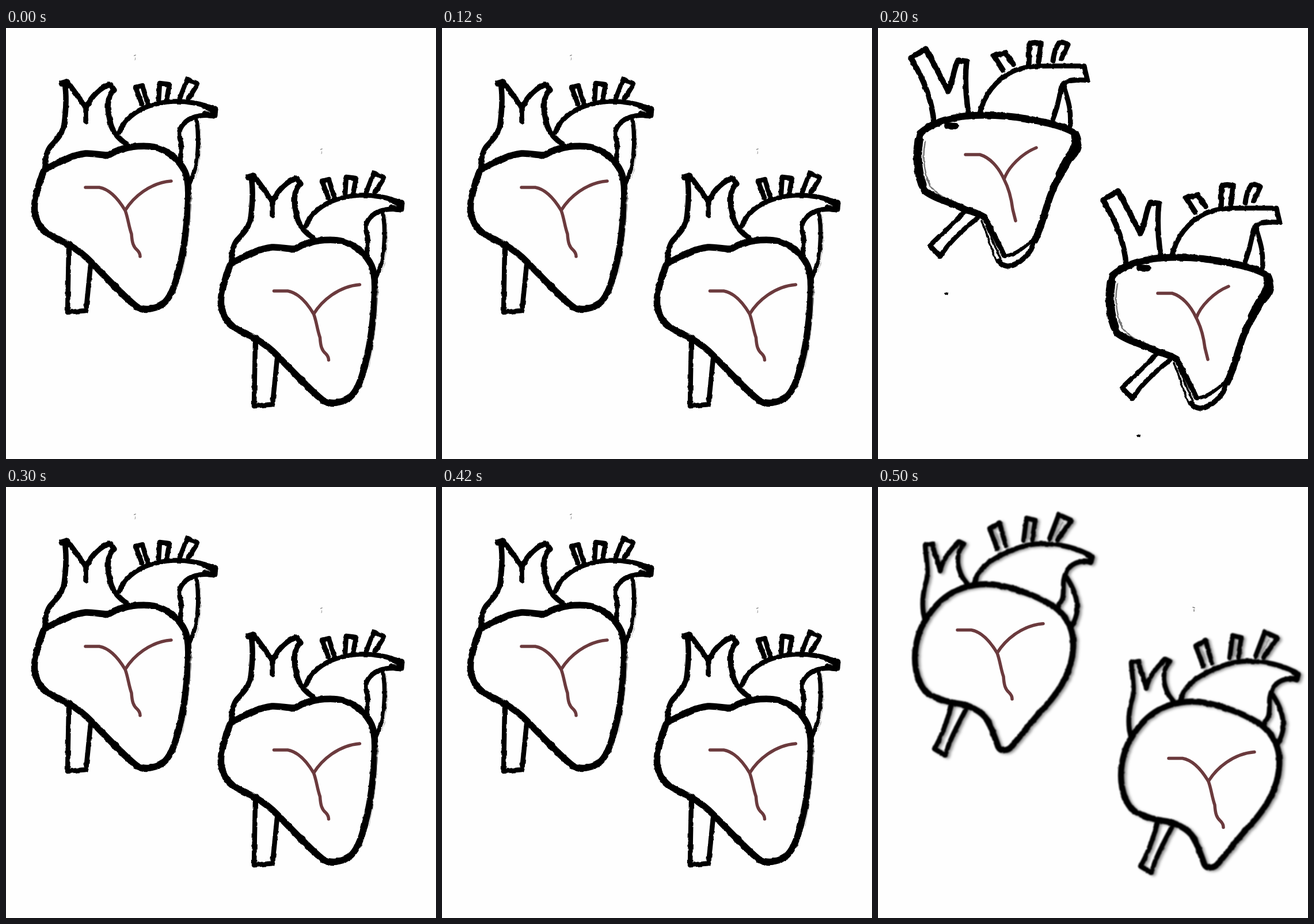
Write an HTML page that moves like this. It is 747x749 px and loops after 0.6 s.

```html
<!DOCTYPE html>
<html lang="en">
<head>
<meta charset="utf-8">
<title>Beating hearts</title>
<style>
  html, body { margin: 0; width: 100%; height: 100%; overflow: hidden; background: #fefefe; }
  svg { display: block; width: 100%; height: 100%; }
  path { fill: none; stroke-linecap: round; stroke-linejoin: round; }
</style>
</head>
<body>
<svg id="stage" viewBox="0 0 747 749" preserveAspectRatio="none">
  <defs>
    <filter id="rough" filterUnits="userSpaceOnUse" x="0" y="0" width="420" height="540" color-interpolation-filters="sRGB">
      <feTurbulence type="fractalNoise" baseFrequency="0.1" numOctaves="2" seed="4"/>
      <feColorMatrix values="1 0 0 0 0  0 1 0 0 0  0 0 1 0 0  0 0 0 0 1"/>
      <feDisplacementMap in="SourceGraphic" scale="3.5" xChannelSelector="R" yChannelSelector="G"/>
      <feGaussianBlur stdDeviation="0.6"/>
    </filter>
    <filter id="shaded" filterUnits="userSpaceOnUse" x="0" y="0" width="420" height="540" color-interpolation-filters="sRGB">
      <feTurbulence type="fractalNoise" baseFrequency="0.1" numOctaves="2" seed="9"/>
      <feColorMatrix values="1 0 0 0 0  0 1 0 0 0  0 0 1 0 0  0 0 0 0 1"/>
      <feDisplacementMap in="SourceGraphic" scale="3" xChannelSelector="R" yChannelSelector="G"/>
      <feGaussianBlur stdDeviation="0.8"/>
      <feDropShadow dx="4" dy="2" stdDeviation="2.2" flood-color="#000" flood-opacity="0.4"/>
    </filter>
  </defs>
</svg>
<script>
const INK = '#000', GREY = '#777', VEIN = '#6b3a3d';
const FORK = 'M138 277H162C179 280 195 297 207 317C221 294 250 269 287 266M207 317C212 330 213 344 218 358C219 373 221 380 228 386Q233 391 233 397';

// Each stroke is [width, path, colour].
const relaxed = {
  filter: 'rough',
  ink: [
    [11.5, 'M66 247C86 235 112 221 138 218C155 217 168 223 180 220C200 206 240 202 262 208C285 215 303 232 311 250C319 268 317 300 315 325C312 365 306 400 299 425C293 450 285 470 272 480C258 489 240 491 228 485C210 472 180 440 148 407C135 393 120 383 108 376C92 367 70 360 60 345C48 328 47 310 53 288C57 270 62 258 66 247Z'],
    [9.5, 'M66 246C68 235 69 215 78 205C88 194 97 186 101 168C104 145 106 120 102 96L96 96L106 93L139 138V162M139 138C149 118 164 103 181 98L188 108C176 115 175 140 180 158C183 180 195 192 210 202'],
    [8.5, 'M196 182C204 161 225 143 250 135C280 126 300 126 325 130C345 133 355 138 364 143L362 153C345 150 325 152 312 163C300 174 299 183 304 198C306 212 302 222 303 232'],
    [11, 'M345 136L363 142L362 152L346 150'],
    [7.5, 'M331 160C336 190 334 215 330 238C326 255 322 263 318 272'],
    [8.5, 'M236 132L225 103L237 100L246 131M265 127L267 96L284 98L279 125M302 122L315 89L333 97L317 123'],
    [8.5, 'M109 384L107 494L139 491L147 412'],
    [1.2, 'M336 165C341 200 339 230 330 260M321 290C322 340 316 380 307 425', '#bbb'],
    [1.5, 'M223 48L226 47M225 52V55', GREY]
  ],
  vein: FORK,
  inkShift: [324, 163],
  veinShift: [327.5, 180]
};

const squeezed = {
  filter: 'rough',
  ink: [
    [12, 'M73 183C90 168 122 154 165 152C210 150 250 155 285 163C310 168 330 175 343 183C352 200 347 215 333 228C323 246 308 268 300 290C290 317 284 347 272 370M73 183C65 215 66 255 81 283C100 298 130 303 152 316Q170 320 185 329'],
    [15, 'M71 195C67 220 68 245 77 272M343 187C346 204 338 216 328 231L316 254'],
    [9, 'M185 329C197 350 207 370 219 395'],
    [6, 'M220 397C240 393 256 381 273 364'],
    [9, 'M271 368C269 391 244 413 225 414Q216 413 210 405'],
    [3.5, 'M180 336C190 356 195 382 207 407M188 344L213 401'],
    [12, 'M121 170L135 171'],
    [2.5, 'M82 198C76 225 81 258 94 279M84 262Q95 284 111 292', GREY],
    [9.5, 'M97 165C95 130 80 90 57 52L83 36L122 110C130 93 131 72 139 56L154 58C150 90 153 120 157 148'],
    [8.5, 'M176 150C185 115 205 90 235 75C260 64 290 66 320 66L358 66L364 91C345 89 330 92 321 97C315 115 312 140 304 158M322 98C328 122 336 136 334 169'],
    [9.5, 'M217 73L201 48L221 43L235 63M262 61L263 28Q272 23 283 28L279 59'],
    [9, 'M304 57Q306 38 315 25Q323 24 330 29L319 53'],
    [8.5, 'M150 320C130 340 110 359 90 378L108 397C124 371 149 349 172 331'],
    [4, 'M117 461L120 462']
  ],
  vein: 'M152 220H177C194 225 209 241 219 263C226 242 250 218 275 208M219 263C229 282 232 299 234 315L239 335',
  inkShift: [334, 247],
  veinShift: [334, 241]
};

const swollen = {
  filter: 'shaded',
  ink: [
    [10.5, 'M82 232C95 210 112 193 130 183C150 172 180 165 210 171C245 177 285 193 310 211C330 228 341 250 339 280C337 320 315 355 290 382C270 403 250 430 233 450C226 459 213 460 209 452C203 435 197 418 190 405C180 390 160 380 143 377C120 374 95 366 82 355C66 335 61 305 66 275C70 255 75 242 82 232Z'],
    [8.5, 'M82 232C75 210 77 190 82 170C90 150 83 125 82 101L95 98C96 115 104 125 108 146C112 125 126 110 141 95L149 99C137 112 137 130 141 143C145 157 150 162 155 168'],
    [8.5, 'M168 165C174 138 205 120 240 107C270 95 300 97 330 104C350 109 362 115 372 121L369 131C350 125 333 135 327 148C318 165 325 180 320 195L311 212'],
    [11, 'M365 118L371 122L369 130'],
    [8.5, 'M326 155C340 175 347 195 346 215C344 230 340 235 336 243'],
    [8.5, 'M207 107L194 72L211 62L222 102M253 93L258 54L273 58L268 92M298 90L314 48L336 58L312 92'],
    [3, 'M203 78L210 96M263 66L260 88M321 61L307 86', '#999'],
    [8.5, 'M128 378C122 400 113 430 98 455L117 466C124 440 138 415 152 388']
  ],
  vein: FORK,
  veinAt: [0, -28.5],
  inkShift: [358, 204],
  veinShift: [367, 223],
  speck: 'M547 209L550 210M549 213V216'
};

const stage = document.getElementById('stage');

function add(parent, tag, attrs) {
  const el = document.createElementNS('http://www.w3.org/2000/svg', tag);
  for (const key in attrs) el.setAttribute(key, attrs[key]);
  return parent.appendChild(el);
}

function stroke(parent, width, d, colour = INK) {
  return add(parent, 'path', { d, stroke: colour, 'stroke-width': width });
}

function group(parent, [x, y]) {
  return add(parent, 'g', { transform: `translate(${x} ${y})` });
}

function build(pose) {
  const root = add(stage, 'g', { visibility: 'hidden' });
  const [vx, vy] = pose.veinAt || [0, 0];
  const [sx, sy] = pose.veinShift;
  for (const k of [0, 1]) {
    const ink = group(root, pose.inkShift.map(v => v * k));
    const lines = add(ink, 'g', { filter: `url(#${pose.filter})` });
    for (const line of pose.ink) stroke(lines, ...line);
    stroke(group(root, [vx + sx * k, vy + sy * k]), 5.5, pose.vein, VEIN);
  }
  if (pose.speck) stroke(root, 1.5, pose.speck, GREY);
  return root;
}

const [rest, squeeze, swell] = [relaxed, squeezed, swollen].map(build);
const beat = [[200, rest], [300, squeeze], [500, rest], [600, swell]];
let shown = null;

function draw(ms) {
  const t = ms % 600;
  const next = beat.find(([end]) => t < end)[1];
  if (next === shown) return;
  if (shown) shown.setAttribute('visibility', 'hidden');
  next.setAttribute('visibility', 'visible');
  shown = next;
}

function tick() {
  draw(performance.now() - start);
  requestAnimationFrame(tick);
}

const start = performance.now();
tick();
</script>
</body>
</html>
```
